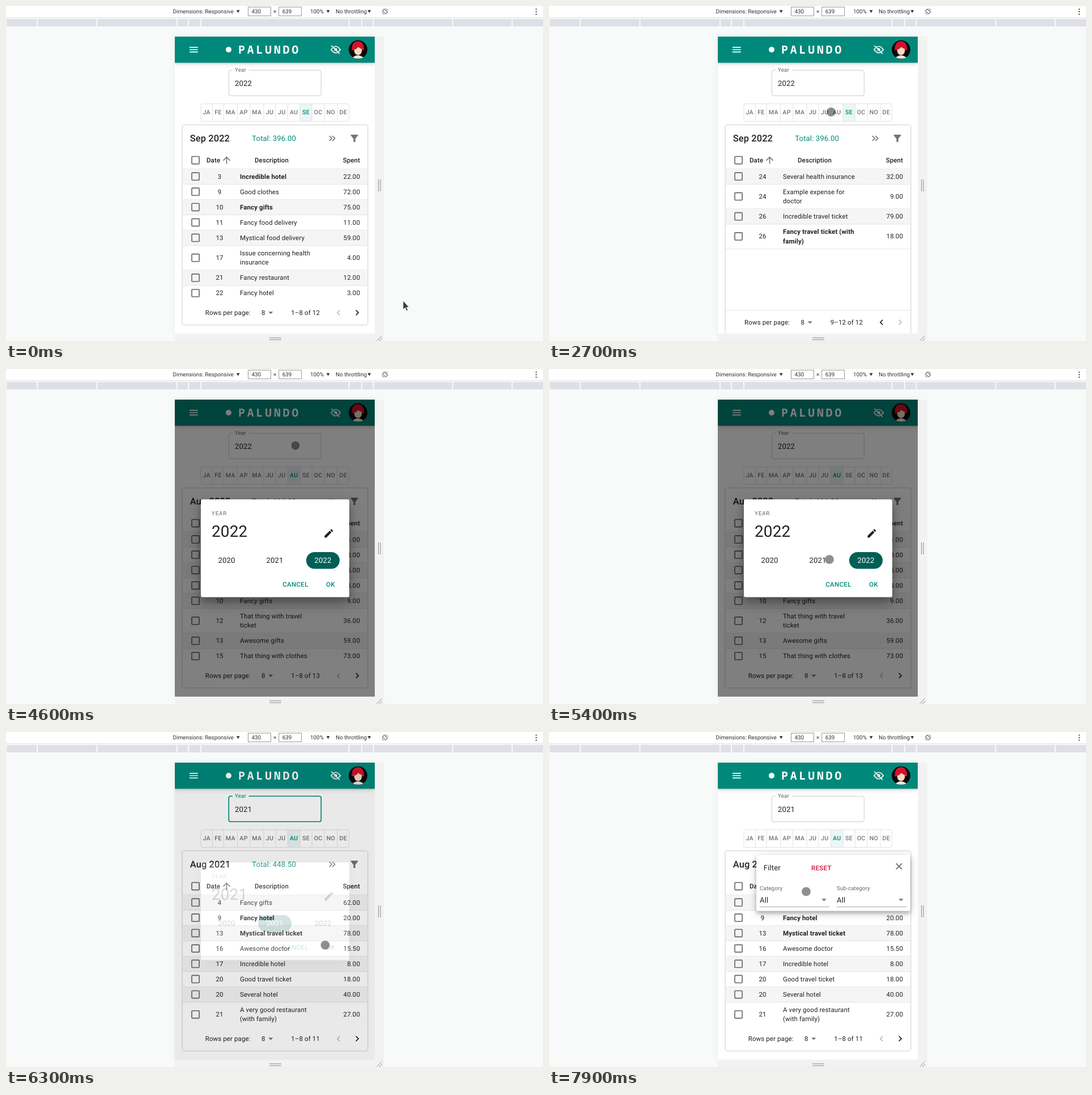
These frames come from a looping animation (948 px wide and 591 px high, 8 s). An HTML page:

```html
<!DOCTYPE html>
<html lang="en">
<head>
<meta charset="utf-8">
<title>Expense table</title>
<style>
  html, body { margin: 0; width: 100%; height: 100%; overflow: hidden; background: #f8f9f9; }
  svg { display: block; width: 948px; height: 591px; font-family: Roboto, sans-serif; text-rendering: geometricPrecision; }
  .frame { filter: drop-shadow(0 0 5px rgba(0,0,0,.06)); }
  .bar { filter: drop-shadow(0 1.6px 1.6px rgba(0,0,0,.22)) drop-shadow(0 1px 4px rgba(0,0,0,.16)); }
  .card { filter: drop-shadow(0 .8px .9px rgba(0,0,0,.28)) drop-shadow(0 0 1.4px rgba(0,0,0,.14)); }
  .dialog { filter: drop-shadow(0 8px 7px rgba(0,0,0,.24)) drop-shadow(0 9px 14px rgba(0,0,0,.2)); }
  .popup { filter: drop-shadow(0 4px 3px rgba(0,0,0,.2)) drop-shadow(0 3px 7px rgba(0,0,0,.2)); }
  #popover { transform-origin: 614px 225px; }
</style>
</head>
<body>
<svg id="stage" viewBox="0 0 948 591" xmlns="http://www.w3.org/2000/svg"></svg>
<script>
const LOOP = 8000, STEP = 100, K = 0.82;
const TEAL = '#00897b', INK = '#212121', SOFT = '#666', MUTED = '#757575', LINE = '#e0e0e0';

// Drawing helpers; y is the optical centre of a text line
const text = (x, y, s, { size = 14, w = 400, fill = INK, a = 'start', ls = 0.0107, font = '' } = {}) => {
  const px = size * K;
  return `<text x="${x}" y="${y + px * 0.35}" font-size="${px}" font-weight="${w}" fill="${fill}"
    text-anchor="${a}" letter-spacing="${ls * px}" ${font && `font-family="${font}"`}>${s}</text>`;
};
const rect = (x, y, w, h, fill, more = '') =>
  `<rect x="${x}" y="${y}" width="${w}" height="${h}" fill="${fill}" ${more}/>`;
const line = (d, color, width = K, more = '') =>
  `<path d="${d}" fill="none" stroke="${color}" stroke-width="${width}" ${more}/>`;
const icon = (x, y, d, fill) =>
  `<path transform="translate(${x - 12 * K} ${y - 12 * K}) scale(${K})" d="${d}" fill="${fill}"/>`;
const dot = (x, y, r, fill) => `<circle cx="${x}" cy="${y}" r="${r}" fill="${fill}"/>`;

const ICON = {
  menu: 'M3 18h18v-2H3zm0-5h18v-2H3zm0-7v2h18V6z',
  twice: 'M6.4 6 5 7.4 9.6 12 5 16.6 6.4 18l6-6zM13 6l-1.4 1.4 4.6 4.6-4.6 4.6L13 18l6-6z',
  funnel: 'M4.25 5.6 10 13v6c0 .55.45 1 1 1h2c.55 0 1-.45 1-1v-6l5.74-7.4A1 1 0 0 0 18.95 4H5.04c-.83 0-1.3.95-.79 1.6z',
  up: 'M4 12l1.4 1.4L11 7.8V20h2V7.8l5.6 5.6L20 12l-8-8z',
  drop: 'M7 10l5 5 5-5z',
  left: 'M15.4 7.4 14 6l-6 6 6 6 1.4-1.4L10.8 12z',
  right: 'M10 6 8.6 7.4l4.6 4.6-4.6 4.6L10 18l6-6z',
  close: 'M19 6.4 17.6 5 12 10.6 6.4 5 5 6.4l5.6 5.6L5 17.6 6.4 19l5.6-5.6 5.6 5.6 1.4-1.4-5.6-5.6z',
  pen: 'M3 17.25V21h3.75L17.8 9.94l-3.75-3.75zM20.7 7.04a1 1 0 0 0 0-1.41l-2.34-2.34a1 1 0 0 0-1.41 0l-1.83 1.83 3.75 3.75z'
};

// Rows: day, description, amount; "*" marks bold, "|" a line break
const SEP_A = `3,*Incredible hotel,22.00;9,Good clothes,72.00;10,*Fancy gifts,75.00;11,Fancy food delivery,11.00;
13,Mystical food delivery,59.00;17,Issue concerning health|insurance,4.00;21,Fancy restaurant,12.00;22,Fancy hotel,3.00`;
const SEP_B = `24,Several health insurance,32.00;24,Example expense for|doctor,9.00;26,Incredible travel ticket,79.00;
26,*Fancy travel ticket (with|family),18.00`;
const AUG_22 = `2,A very good food delivery,1.00;3,*Several gifts,50.00;7,*Good hotel,45.00;10,Disappointing clothes,94.00;
10,Fancy gifts,9.00;12,That thing with travel|ticket,36.00;13,Awesome gifts,59.00;15,That thing with clothes,73.00`;
const AUG_21 = `4,Fancy gifts,62.00;9,*Fancy hotel,20.00;13,*Mystical travel ticket,78.00;16,Awesome doctor,15.50;
17,Incredible hotel,8.00;20,Good travel ticket,18.00;20,Several hotel,40.00;21,A very good restaurant|(with family),27.00`;

const VIEWS = [
  { at: 0, year: 2022, month: 8, total: '396.00', rows: SEP_A, range: '1–8 of 12' },
  { at: 1900, year: 2022, month: 8, total: '396.00', rows: SEP_B, range: '9–12 of 12', last: true },
  { at: 3400, year: 2022, month: 7, total: '614.00', rows: AUG_22, range: '1–8 of 13' },
  { at: 5500, year: 2021, month: 7, total: '448.50', rows: AUG_21, range: '1–8 of 11' }
];
const MONTHS = 'JA FE MA AP MA JU JU AU SE OC NO DE'.split(' ');
const EDGES = [344, 364.5, 384.3, 408.5, 430.7, 455, 476, 497.5, 519, 540.2, 562, 585, 605.5];

const checkbox = y => rect(328, y - 6.5, 13.1, 13.1, 'none', `rx="1" stroke="${SOFT}" stroke-width="1.64"`);

function yearField(year, focus) {
  const color = focus ? TEAL : '#c0c0c0';
  return rect(393.3, 113.3, 163, 45, 'none', `rx="3.3" stroke="${color}" stroke-width="${focus ? 1.64 : K}"`)
    + rect(400, 111, 28.5, 5, '#fff')
    + text(404, 113, 'Year', { size: 12, fill: focus ? TEAL : SOFT })
    + text(404, 136.3, year, { size: 16 });
}

function monthPicker(month) {
  let s = rect(EDGES[month], 172.5, EDGES[month + 1] - EDGES[month], 31, TEAL, 'fill-opacity=".08"')
    + rect(344, 172.5, 261.5, 31, 'none', `rx="3" stroke="#dcdcdc" stroke-width="${K}"`);
  MONTHS.forEach((m, i) => {
    if (i) s += line(`M${EDGES[i]} 172.5v31`, '#dcdcdc');
    s += text((EDGES[i] + EDGES[i + 1]) / 2, 187.6, m,
      { size: 13, w: 500, a: 'middle', ls: 0.0286, fill: i === month ? TEAL : MUTED });
  });
  return s;
}

function tableRows(view) {
  let y = 287.6, s = '';
  const rows = view.rows.split(';');
  rows.forEach((row, i) => {
    const [day, desc, sum] = row.trim().split(',');
    const bold = desc[0] === '*', parts = desc.replace('*', '').split('|');
    const h = (parts.length > 1 ? 53 : 33) * K, mid = y + h / 2 - 0.5;
    if (i % 2 === 0) s += rect(311.7, y, 326.5, h, '#f5f5f5');
    if (i < 7) s += line(`M311.7 ${y + h - 0.3}h326.5`, LINE);
    s += checkbox(mid) + text(377, mid, day, { a: 'middle' }) + text(625, mid, sum, { a: 'end' });
    parts.forEach((p, n) => {
      s += text(413, mid + (n - (parts.length - 1) / 2) * 16.4, p, { w: bold ? 700 : 400 });
    });
    y += h;
  });
  return s;
}

function footer(view) {
  const y = view.last ? 558 : 541, dx = view.last ? -6.6 : 0;
  const on = '#212121', off = '#bdbdbd';
  return (view.last ? line('M311.7 536.4h326.5', LINE) : '')
    + text(351.7 + dx, y, 'Rows per page:') + text(451 + dx, y, '8')
    + icon(467.3 + dx, y, ICON.drop, MUTED) + text(554, y, view.range, { a: 'end' })
    + icon(587, y, ICON.left, view.last ? on : off) + icon(620, y, ICON.right, view.last ? off : on);
}

function page(view, focus) {
  const name = view.month === 8 ? 'Sep' : 'Aug';
  return yearField(view.year, focus) + monthPicker(view.month)
    + rect(311.7, 210.3, 326.5, view.last ? 369 : 351.8, '#fff', 'rx="3.3" class="card"')
    + text(324.8, 233.6, `${name} ${view.year}`, { size: 20, w: 500, ls: 0.0075 })
    + text(434.3, 233.2, `Total: ${view.total}`, { size: 16, fill: TEAL, ls: 0.0094 })
    + icon(576, 233.5, ICON.twice, MUTED) + icon(615, 233.5, ICON.funnel, MUTED)
    + checkbox(272) + text(354, 272, 'Date', { w: 500 }) + icon(389.5, 272, ICON.up, MUTED)
    + text(469, 272, 'Description', { w: 500, a: 'middle' }) + text(625, 272, 'Spent', { w: 500, a: 'end' })
    + line('M311.7 287.3h326.5', LINE) + tableRows(view) + footer(view);
}

function dialog(year) {
  let s = rect(344, 230, 262, 172.5, '#fff', 'rx="3.3" class="dialog"')
    + text(363, 254.7, 'YEAR', { size: 12, fill: SOFT, ls: 0.083 })
    + text(363, 286, year, { size: 34, ls: 0.0074 }) + icon(569.8, 290, ICON.pen, INK);
  for (let i = 0; i < 3; i++) {
    const x = 389.5 + i * 85, on = 2020 + i === year;
    if (on) s += rect(x - 29.5, 323, 59, 29.5, '#005f56', 'rx="14.75"');
    s += text(x, 337.6, 2020 + i, { size: 16, a: 'middle', ls: 0.0094, fill: on ? '#fff' : INK });
  }
  const button = { w: 500, fill: TEAL, a: 'middle', ls: 0.0286 };
  return s + text(511, 380, 'CANCEL', button) + text(573, 380, 'OK', button);
}

function filterPanel() {
  const select = (x, label) => text(x, 275.5, label, { size: 12, fill: SOFT })
    + text(x, 296, 'All', { size: 16, ls: 0.0094 })
    + line(`M${x} 308.5h123`, '#949494') + icon(x + 113.5, 296, ICON.drop, MUTED);
  return rect(366, 217, 272, 98.7, '#fff', 'rx="3.3" class="popup"')
    + text(378.8, 239.8, 'Filter', { size: 16, ls: 0.0094 })
    + text(463, 240, 'RESET', { w: 500, fill: '#d8143a', ls: 0.0286 })
    + icon(618, 237, ICON.close, SOFT) + select(372, 'Category') + select(508, 'Sub-category');
}

function toolbar() {
  const small = { size: 12.07, fill: '#333', ls: 0 };
  const caret = x => `<path d="M${x - 2.9} 7.2h5.8l-2.9 5z" fill="#333"/>`;
  const input = (x, s) => rect(x, 2, 40, 15.3, '#fff', 'stroke="#8a8a8a" stroke-width=".9"') + text(x + 6, 9.7, s, small);
  let s = rect(0, 0, 948, 20.5, '#fff') + line('M0 20.7h948', '#d8dadd')
    + text(294.5, 9.7, 'Dimensions: Responsive', small) + caret(409.7)
    + input(427.5, '430') + text(474.7, 9.7, '×', { ...small, a: 'middle' }) + input(481.7, '639')
    + text(537, 9.7, '100%', small) + caret(568.6) + text(582, 9.7, 'No throttling', small) + caret(641.3)
    + `<g transform="translate(669 9.7)">` + rect(-2.2, -4, 4.4, 8, 'none', 'stroke="#555" transform="rotate(-45)"')
    + line('M-5 1a5 5 0 0 0 4 4M5-1a5 5 0 0 0-4-4', '#555', 0.9) + '</g>';
  for (const y of [5.6, 10, 14.4]) s += dot(936, y, 1.2, '#555');
  s += rect(0, 23, 948, 13, '#dee0e5');
  for (const x of [0.3, 55.3, 160.5, 302, 322, 344, 605.5, 628, 648.5, 788.5, 893.5]) s += rect(x - 0.8, 23, 1.6, 13, '#fff');
  return s;
}

function deviceFrame() {
  return rect(298, 54, 353, 524, '#fff', 'class="frame"')
    + rect(651, 54, 16.5, 524, '#f1f2f2') + rect(298, 578, 369.5, 13, '#f1f2f2')
    + line('M657.6 306v21M661 306v21M465 585.3h21M465 588.7h21M654.5 590.5l9-9M659 591l5-5', '#8a8a8a', 1);
}

function appBar() {
  return rect(298, 54, 353, 46, TEAL, 'class="bar"') + icon(331.3, 77, ICON.menu, '#fff')
    + dot(393, 77, 5, '#fff')
    + text(410, 77, 'PALUNDO', { size: 24, w: 700, fill: '#fff', ls: 0.2, font: 'Noto Sans Mono, monospace' })
    + line('M574 77q8-11.5 16.2 0q-8.2 11.5-16.2 0z', '#fff', 1.7) + dot(582, 77, 2.7, '#fff')
    + line('M574.7 70.9l14 14', TEAL, 1.7) + line('M574.2 69.8l14.6 14.6', '#fff', 1.6)
    + dot(621.5, 77, 16.4, '#0b0808')
    + '<path d="M612 91q9-8 19 0q-9 4-19 0z" fill="#efe6da"/>'
    + '<path d="M610.500 78q-1-16 12-16q10 1 9.500 16z" fill="#d0142c"/>'
    + '<ellipse cx="621.500" cy="78.500" rx="6.800" ry="8" fill="#f3d9c4"/>'
    + '<path d="M613 77q0-9 10-10q7 2 7 9q-6-1-8-4q-3 5-9 5z" fill="#d0142c"/>';
}

const stage = document.getElementById('stage');
stage.innerHTML = `<clipPath id="screen">${rect(298, 54, 353, 524, '#000')}</clipPath>
  ${rect(0, 0, 948, 591, '#f8f9f9')}${toolbar()}${deviceFrame()}
  <g clip-path="url(#screen)"><g id="page"></g>${appBar()}
    <g id="modal">${rect(298, 54, 353, 524, '#000', 'fill-opacity=".5"')}<g id="dialog"></g></g>
    <g id="popover">${filterPanel()}</g></g>
  <circle id="touch" r="8" fill="#000" fill-opacity=".44" stroke="#fff" stroke-opacity=".3" stroke-width=".8"/>
  <path id="arrow" d="M0 0v15.500l3.700-3.200 2.400 5.500 2.400-1-2.300-5.300h4.400z" fill="#3a3a3a" stroke="#fff" stroke-width=".8"/>`;
const part = Object.fromEntries(['page', 'modal', 'dialog', 'popover', 'touch', 'arrow']
  .map(id => [id, document.getElementById(id)]));

// Pointer stops: time, x, y
const PATH = [
  [0, 701, 520], [300, 701, 520], [1000, 620, 541.5], [2200, 620, 541.5], [2400, 518, 269], [2600, 518, 269],
  [2700, 498, 187], [3000, 508, 187], [3300, 508, 187], [4200, 511, 135], [4600, 511, 135], [5300, 495, 336],
  [5500, 495, 336], [5900, 563.5, 376], [6300, 563.5, 376], [7000, 615, 234], [7300, 615, 234],
  [7900, 454, 281.5], [LOOP, 454, 281.5]
];

const clamp = v => Math.min(1, Math.max(0, v));
const smooth = v => v * v * (3 - 2 * v);

// cubic-bezier(.4, 0, .2, 1)
function standard(x) {
  let lo = 0, hi = 1, u = 0.5;
  for (let i = 0; i < 20; i++) {
    u = (lo + hi) / 2;
    const bx = 1.2 * u * (1 - u) ** 2 + 0.6 * u * u * (1 - u) + u ** 3;
    if (bx < x) lo = u; else hi = u;
  }
  return u * u * (3 - 2 * u);
}
const ramp = (t, start, length) => {
  const v = clamp((t - start) / length);
  return v === 0 || v === 1 ? v : standard(v);
};

function pointer(t) {
  const i = PATH.findIndex(p => p[0] > t);
  const [t0, x0, y0] = PATH[i - 1], [t1, x1, y1] = PATH[i];
  const v = smooth((t - t0) / (t1 - t0));
  return [x0 + (x1 - x0) * v, y0 + (y1 - y0) * v];
}

let shown = '';
function render(t) {
  const view = VIEWS.filter(v => v.at <= t).pop();
  const focus = t >= 6200 && t < 7400;
  const key = view.at + '/' + focus;
  if (key !== shown) {
    shown = key;
    part.page.innerHTML = page(view, focus);
    part.dialog.innerHTML = dialog(view.year);
  }
  part.modal.setAttribute('opacity', ramp(t, 4382, 225) * (1 - ramp(t, 6193, 195)));

  const grow = ramp(t, 7390, 160);
  part.popover.setAttribute('opacity', ramp(t, 7390, 240));
  part.popover.style.transform = `scale(${0.75 + 0.25 * grow}, ${0.5625 + 0.4375 * grow})`;

  const [x, y] = pointer(t), inside = x < 651;
  part.touch.setAttribute('visibility', inside ? 'visible' : 'hidden');
  part.arrow.setAttribute('visibility', inside ? 'hidden' : 'visible');
  for (const p of [part.touch, part.arrow]) p.setAttribute('transform', `translate(${x} ${y})`);
}

// The screen refreshes ten times a second
const began = performance.now();
function tick() {
  const t = (performance.now() - began) % LOOP;
  render(Math.floor(t / STEP) * STEP);
  requestAnimationFrame(tick);
}
tick();
</script>
</body>
</html>
```
